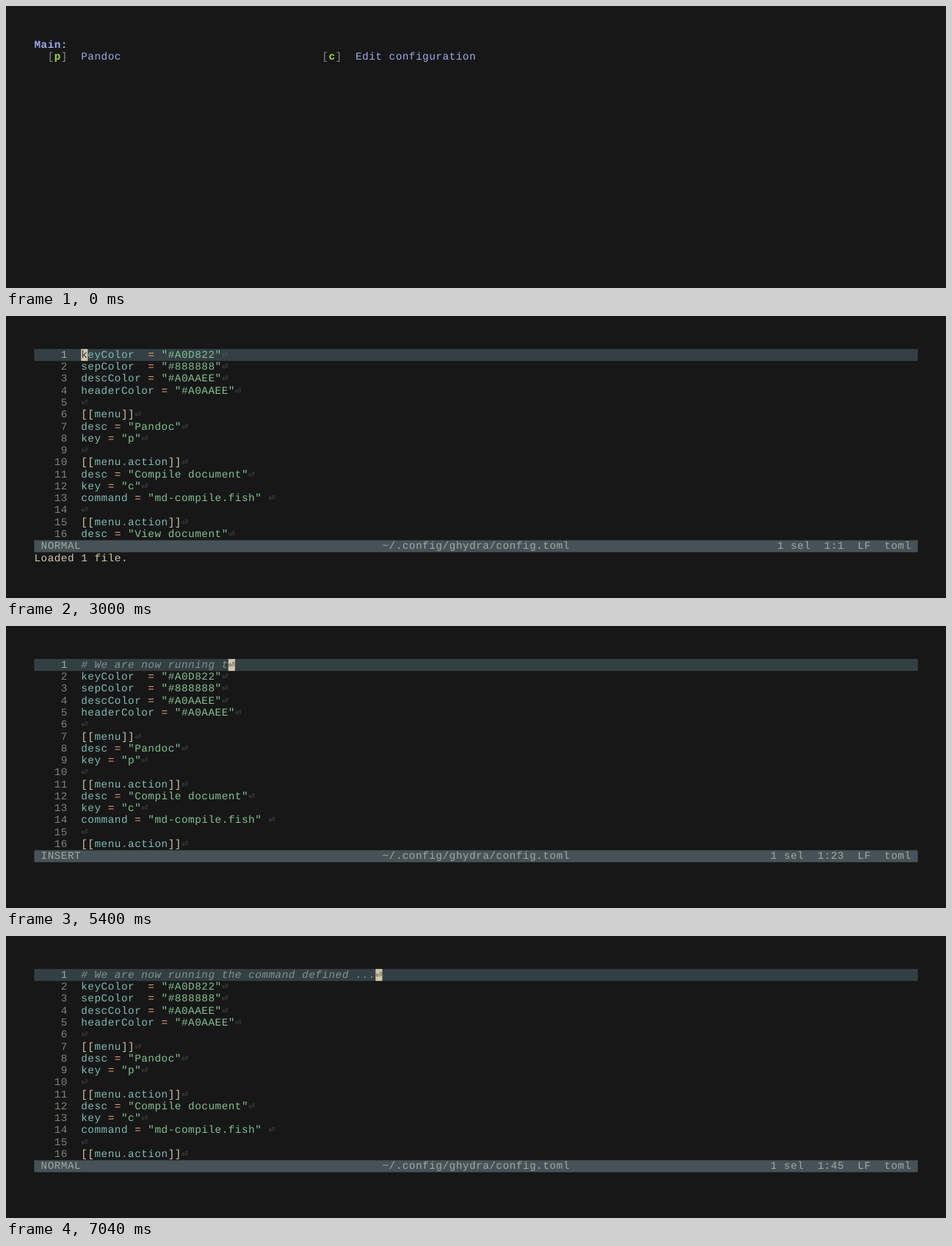
These frames come from a looping animation (1280 px wide and 384 px high, 8000 ms). An HTML page:

```html
<!DOCTYPE html>
<html lang="en">
<head>
<meta charset="utf-8">
<title>Terminal menu</title>
<style>
  html, body { margin: 0; width: 100%; height: 100%; overflow: hidden; background: #171717; }
  svg { display: block; width: 1280px; height: 384px; }
  text {
    font: 22px "Liberation Mono", "DejaVu Sans Mono", monospace;
    letter-spacing: 0.798px;
    white-space: pre;
    text-rendering: geometricPrecision;
  }
  .b { font-weight: 700; }
  .i { font-style: italic; }
</style>
</head>
<body>
<svg viewBox="0 0 1280 384"><g id="screen" transform="translate(38.4 44.9) scale(.6511)"></g></svg>
<script>
const LOOP = 8000, STEP = 40;
const CW = 14, CH = 25, COLS = 132, ROWS = 16, GUTTER = 7;
const C = {
  text: '#dddddd', prompt: '#5468d8',
  head: '#a0aaee', sep: '#888888', key: '#a0d84e',
  fg: '#d3c6aa', dark: '#2d353b', line: '#343f44', bar: '#475258', barText: '#9da9a0',
  num: '#7a8478', comment: '#859289', name: '#7fbbb3', str: '#83c092', op: '#e69875', mark: '#4f585e'
};
const EOL = '\u23ce';
const NOTE = '# We are now running the command defined ...';
const FILE = `keyColor  = "#A0D822"
sepColor  = "#888888"
descColor = "#A0AAEE"
headerColor = "#A0AAEE"

[[menu]]
desc = "Pandoc"
key = "p"

[[menu.action]]
desc = "Compile document"
key = "c"
command = "md-compile.fish" 

[[menu.action]]
desc = "View document"`.split('\n');

// [time, characters typed]
const TYPING = [
  [4120, 1], [4440, 7], [4480, 8], [4920, 14], [4960, 15], [5400, 22], [5480, 23],
  [5760, 27], [5800, 28], [5840, 29], [6600, 41], [6680, 42], [6800, 44]
];

const text = (col, row, s, fill, cls = '') =>
  `<text x="${col * CW}" y="${row * CH + 18.4}" fill="${fill}" class="${cls}">${s.replace(/</g, '&lt;')}</text>`;

const block = (col, row, w, fill, h = 1) =>
  `<rect x="${col * CW}" y="${row * CH}" width="${w * CW}" height="${h * CH}" fill="${fill}"/>`;

function typedAt(t) {
  if (t < TYPING[0][0]) return 0;
  for (let i = 1; i < TYPING.length; i++) {
    const [t0, n0] = TYPING[i - 1], [t1, n1] = TYPING[i];
    if (t < t1) return Math.floor(n0 + (n1 - n0) * (t - t0) / (t1 - t0) + 1e-6);
  }
  return NOTE.length;
}

function menu(title, items) {
  return text(0, 0, title + ':', C.head, 'b') + items.map(([key, desc], i) => {
    const col = 2 + 41 * (i % 3), row = 1 + Math.floor(i / 3);
    return text(col, row, '[', C.sep) + text(col + 1, row, key, C.key, 'b') +
      text(col + 2, row, ']', C.sep) + text(col + 5, row, desc, C.head);
  }).join('');
}

function shell() {
  return text(0, 0, '>', C.prompt) + text(2, 0, 'eval (ghydra)', C.text) + block(0, 1, 1, C.text);
}

function tokenColor(s) {
  if (s[0] === '"') return C.str;
  if (s === '=') return C.op;
  if (s === '.') return C.comment;
  return /\w/.test(s) ? C.name : C.fg;
}

function codeLine(s, row) {
  let out = '';
  if (s[0] === '#') out = text(GUTTER, row, s, C.comment, 'i');
  else for (const m of s.matchAll(/"[^"]*"|\w+|=|\.|[\[\]]+/g))
    out += text(GUTTER + m.index, row, m[0], tokenColor(m[0]));
  return out + text(GUTTER + s.length, row, EOL, C.mark);
}

function popup(n) {
  const words = ['command', 'compile', 'Compile'].slice(0, n === 28 ? 3 : 1);
  return block(27, 1, 20, C.bar, words.length) + words.map((w, i) =>
    text(28, i + 1, w, C.fg) + text(42, i + 1, 'text', C.fg)).join('');
}

function editor(t) {
  const opened = t >= 3840, n = typedAt(t);
  const lines = (opened ? [NOTE.slice(0, n), ...FILE] : FILE).slice(0, ROWS);
  const info = `1 sel  1:${n + 1}  LF  toml`;
  const path = '~/.config/ghydra/config.toml';
  const mode = opened && t < 7040 ? 'INSERT' : 'NORMAL';
  let out = block(0, 0, COLS, C.line);
  lines.forEach((s, row) => {
    out += text(0, row, String(row + 1).padStart(5), row ? C.num : C.barText) + codeLine(s, row);
  });
  out += block(GUTTER + n, 0, 1, C.fg) + text(GUTTER + n, 0, lines[0][n] || EOL, C.dark);
  out += block(0, ROWS, COLS, C.bar) + text(1, ROWS, mode, C.barText) +
    text((COLS - path.length) / 2, ROWS, path, C.barText) +
    text(COLS - 1 - info.length, ROWS, info, C.barText);
  if (t >= 3000 && !opened) out += text(0, ROWS + 1, 'Loaded 1 file.', C.fg);
  if (n >= 28 && n <= 32) out += popup(n);
  return out;
}

function scene(t) {
  if (t < 1400) return menu('Main', [['p', 'Pandoc'], ['c', 'Edit configuration']]);
  if (t < 2880) return menu('Edit configuration',
    [['g', 'ghydra'], ['f', 'fish'], ['h', 'Helix editor'], ['b', 'bat']]);
  if (t < 2920) return shell();
  if (t < 2960) return block(0, 0, 1, C.text);
  return editor(t);
}

const screen = document.getElementById('screen');
let shown = -1;
function draw() {
  const t = Math.floor(performance.now() % LOOP / STEP) * STEP;
  if (t !== shown) {
    shown = t;
    screen.innerHTML = scene(t);
  }
  requestAnimationFrame(draw);
}
draw();
</script>
</body>
</html>
```
